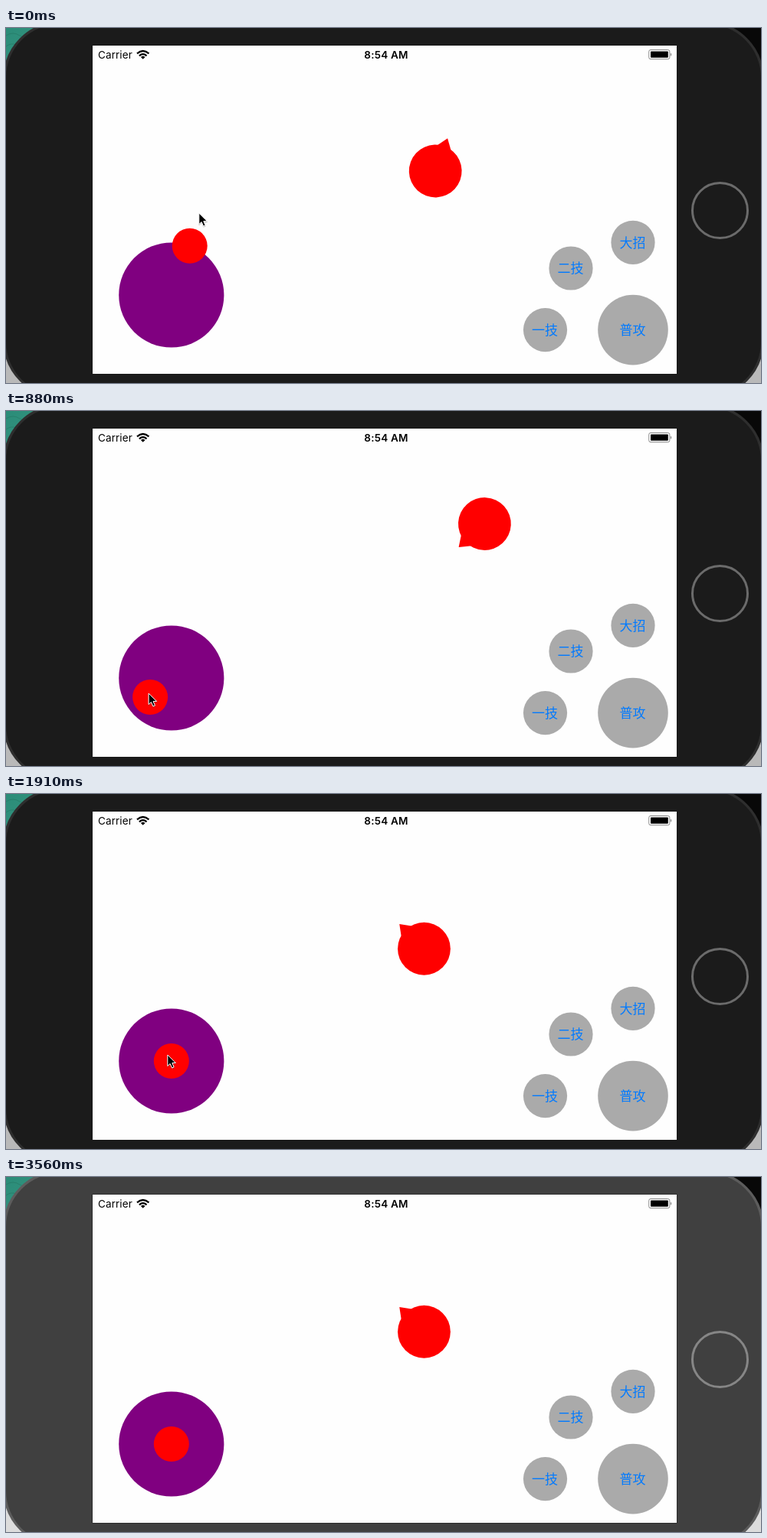
An HTML page that plays this animation: 985 by 464 pixels, repeating every 3620 ms.

```html
<!DOCTYPE html>
<html lang="zh-CN">
<head>
<meta charset="utf-8">
<title>Joystick demo</title>
<style>
  html, body { margin: 0; width: 100%; height: 100%; overflow: hidden; background: #1b1b1b; }
  svg { display: block; width: 985px; height: 464px; }
  .status { font: 13.5px Inter, sans-serif; letter-spacing: .1px; }
  .clock { font-weight: 600; text-anchor: middle; letter-spacing: .2px; }
  .skill circle { fill: #aaa; }
  .skill text { font: 17px "Noto Sans CJK SC", "Noto Sans CJK", sans-serif; fill: #007aff; text-anchor: middle; }
  .bezel { fill: #1b1b1b; stroke: #2e2e2e; stroke-width: 6.5; paint-order: stroke; }
  .home { fill: none; stroke: #6b6b6b; stroke-width: 3; }
  .desk { fill: #b9b9b9; }
  .flash .bezel { fill: #404040; stroke: #5c5c5c; }
  .flash .home { stroke: #868686; }
  .flash .desk { fill: #dcdcdc; }
</style>
</head>
<body>
<svg id="stage" viewBox="0 0 985 464">
  <defs>
    <linearGradient id="sea" x2="1" y2="1">
      <stop offset="0" stop-color="#2b8c78"/>
      <stop offset="1" stop-color="#3c9c88"/>
    </linearGradient>
    <filter id="shade" x="-50%" y="-50%" width="200%" height="200%">
      <feDropShadow dx="0" dy="1" stdDeviation=".7" flood-opacity=".3"/>
    </filter>
  </defs>

  <rect width="985" height="464" fill="#080808"/>
  <rect width="80" height="80" fill="url(#sea)"/>
  <path d="M0 10q9-6 18 0t20-5M0 24q7-5 13-2t13-6" fill="none" stroke="#23705f" opacity=".5"/>
  <path class="desk" d="M0 400h80v64H0zM905 400h80v64h-80z"/>
  <rect class="bezel" x="0" y="-5" width="985" height="485" rx="70"/>
  <circle class="home" cx="931.5" cy="238.5" r="36"/>
  <rect x="113" y="23" width="762" height="429" fill="#fefefe" stroke="#1b1b1b" paint-order="stroke"/>

  <text class="status" x="120" y="39.5">Carrier</text>
  <path d="M171 33.4q7.7-6.8 15.4 0M173.9 36.3q4.8-4.2 9.6 0" fill="none" stroke="#000" stroke-width="2.2"/>
  <path d="M175.9 38q2.8-2.3 5.6 0l-2.8 2.8z"/>
  <text class="status clock" x="496" y="39.5">8:54 AM</text>
  <rect x="838.8" y="28.5" width="27" height="12.2" rx="2.2" fill="none" stroke="#888"/>
  <rect x="841" y="30.4" width="22.8" height="8.4" rx=".8"/>
  <path d="M867 32.5q2.4 2.1 0 4.4z" fill="#777"/>

  <g id="skills"></g>
  <circle cx="215.8" cy="349" r="68.6" fill="#800080"/>
  <circle id="knob" r="23" fill="red"/>
  <g id="hero" fill="red">
    <circle r="34.4"/>
    <path d="M45.5 0L30 11.4V-11.4z"/>
  </g>
  <path id="cursor" d="M0 0V14.5L3.3 11.5 5.8 17 8.3 16 6 10.5H10.5z"
        stroke="#fff" filter="url(#shade)"/>
</svg>

<script>
const LOOP = 3620, FLASH = 3560;
const TICK = 147.2, LEAD = 10;   // the picture updates once per tick
const RELEASE = 12.9;            // tick at which the joystick is let go
const PAD = { x: 215.8, y: 349, radius: 68.5 };
const START = { x: 560.2, y: 187 }, SPEED = 16.7;

const linear = t => t;
const smooth = t => t * t * (3 - 2 * t);
const easeOut = t => 1 - (1 - t) ** 2;

// Strokes of the pointer around the pad centre; each begins where the last one ended.
const strokes = [
  { until: 1, end: [38, -102] },
  { until: 5, end: [112, 14], via: [130, -90], ease: smooth },
  { until: 8, end: [-75, 80], via: [-54, -5], ease: easeOut },
  { until: 9, end: [-75, 80] },
  { until: 11, end: [-4, 5], via: [-30, 72] },
  { until: 12, end: [-3, -3] },
  { until: 14, end: [-3, -3] },
  { until: 15, end: [18, 9] },
  { until: 16, end: [663, 16] },
  { until: 19, end: [680, 165], via: [700, 82] }
];

function touchAt(tick) {
  let index = strokes.findIndex(stroke => tick < stroke.until);
  if (index < 0) return strokes.at(-1).end;
  const { until, end, via, ease = linear } = strokes[index];
  const { until: since, end: begin } = strokes[index - 1] ?? { until: 0, end };
  const t = ease((tick - since) / (until - since));
  return end.map((to, axis) => {
    const from = begin[axis];
    const bend = via ? via[axis] : (from + to) / 2;
    return from * (1 - t) ** 2 + 2 * bend * t * (1 - t) + to * t * t;
  });
}

function headingAt(tick) {
  const [x, y] = touchAt(Math.min(tick, RELEASE));
  return Math.atan2(y, x);
}

// The hero walks at constant speed wherever the joystick points.
function heroAt(tick) {
  const last = Math.min(tick, RELEASE), dt = .1;
  let { x, y } = START;
  for (let t = dt / 2; t < last; t += dt) {
    const heading = headingAt(t);
    x += SPEED * dt * Math.cos(heading);
    y += SPEED * dt * Math.sin(heading);
  }
  return [x, y];
}

const get = id => document.getElementById(id);
const [stage, knob, hero, cursor] = ["stage", "knob", "hero", "cursor"].map(get);
const place = (el, x, y, turn = 0) =>
  el.setAttribute("transform", `translate(${x} ${y}) rotate(${turn * 180 / Math.PI})`);

const skill = (label, x, y, r = 28.6) =>
  `<g class="skill"><circle cx="${x}" cy="${y}" r="${r}"/><text x="${x - .5}" y="${y + 6.3}">${label}</text></g>`;
get("skills").innerHTML =
  skill("大招", 818, 280.3) + skill("二技", 737, 314) +
  skill("一技", 703.5, 394.6) + skill("普攻", 818, 394.6, 45.8);

function draw(time) {
  const tick = Math.floor((time + LEAD) / TICK);
  const [x, y] = touchAt(tick);
  const heading = headingAt(tick);
  const reach = tick < RELEASE ? Math.min(Math.hypot(x, y), PAD.radius) : 0;
  place(hero, ...heroAt(tick), heading);
  place(knob, PAD.x + reach * Math.cos(heading), PAD.y + reach * Math.sin(heading));
  place(cursor, PAD.x + x - 2, PAD.y + y - 5);
  stage.classList.toggle("flash", time >= FLASH);
}

const start = performance.now();
function loop() {
  draw((performance.now() - start) % LOOP);
  requestAnimationFrame(loop);
}
loop();
</script>
</body>
</html>
```
